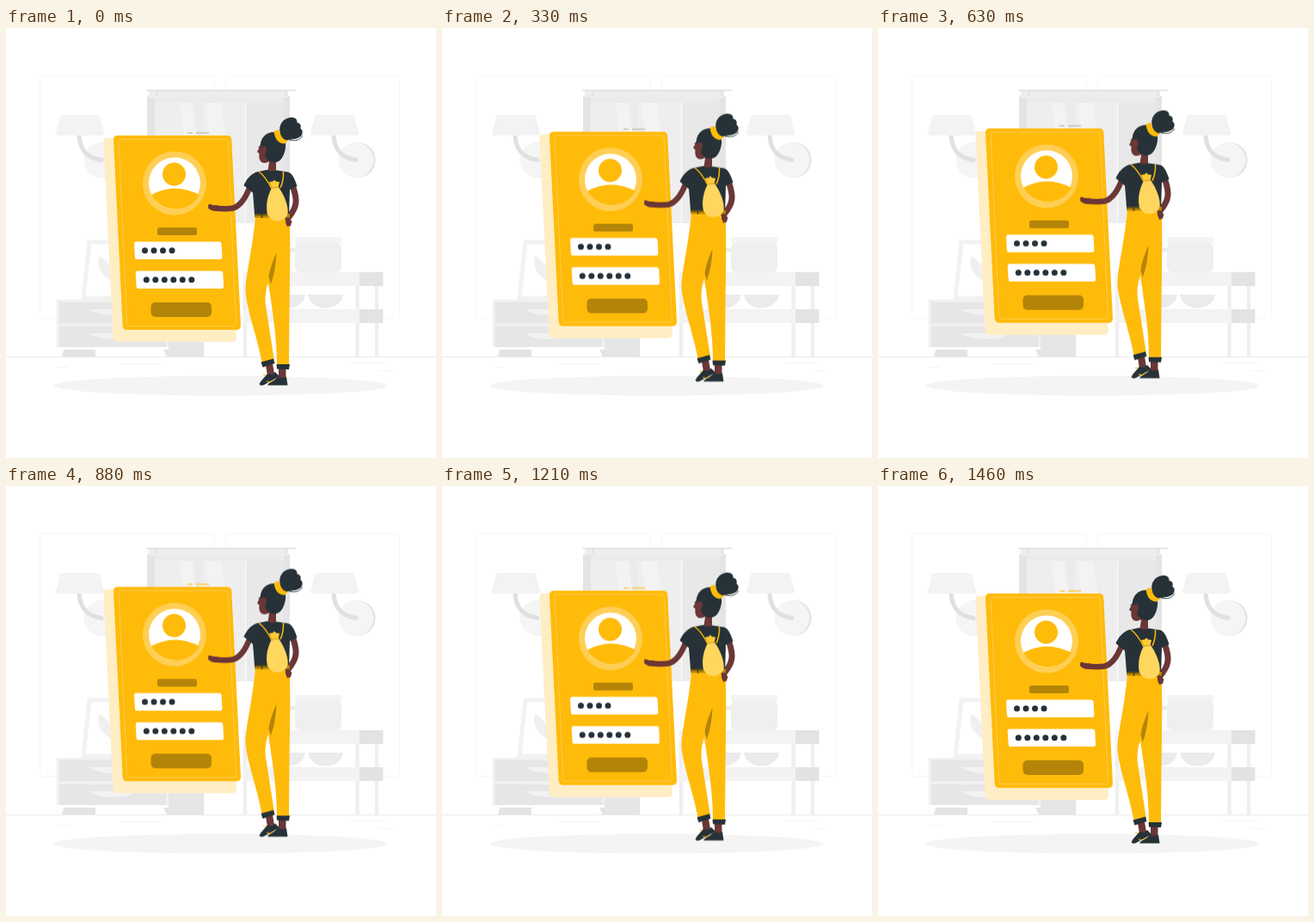
Recreate the animation shown at these times as an HTML page without scripts. Size 500 px wide and 500 px high, loop 1500 ms.

```html
<!DOCTYPE html>
<html lang="en">
<head>
<meta charset="utf-8">
<title>Login card</title>
<style>
  html, body { margin: 0; width: 100%; height: 100%; overflow: hidden; background: #fff; }
  svg { display: block; width: 100vw; height: 100vh; }
  .float { animation: float 750ms steps(18, jump-none) -4ms infinite alternate; }
  .dash { animation: tint 1500ms step-end infinite; }
  @keyframes float { to { transform: translateY(-9.4px); } }
  @keyframes tint { 0% { stroke: #c9c3b4; } 50% { stroke: #ffcb4a; } }
  .gold { fill: #ffbb0a; }
  .ochre { fill: #b38407; }
  .dark { fill: #263238; }
  .skin { fill: #6b3636; }
  .limb { fill: none; stroke: #6b3636; stroke-linecap: round; stroke-linejoin: round; }
  .strap { fill: none; stroke: #ffbb0a; stroke-width: 1.5; }
</style>
</head>
<body>
<svg viewBox="0 0 500 500">
  <defs>
    <g id="lamp">
      <circle cx="55" cy="53.500" r="20.500" fill="#e0e0e0"/>
      <circle cx="53" cy="53.500" r="20.500" fill="#f5f5f5"/>
      <path d="M27 25C28 43 37 51 53 53.500" fill="none" stroke="#e0e0e0" stroke-width="5" stroke-linecap="round"/>
      <path d="M8 1H48Q50 1 51 3L56 22Q56 25 53 25H2Q0 25 0 22L5 3Q6 1 8 1Z" fill="#f3f3f3"/>
    </g>
    <g id="drawer">
      <rect width="124" height="24" fill="#e6e6e6"/>
      <path d="M35 8H90C83 17 44 17 35 8Z" fill="#f2f2f2"/>
    </g>
    <g id="shelf">
      <rect x="276" width="135" height="16" fill="#f3f3f3"/>
      <rect x="411" width="27.500" height="16" fill="#e3e3e3"/>
    </g>
    <path id="bowl" d="M0 0H41C38 21 3 21 0 0Z" fill="#ebebeb"/>
    <circle id="dot" r="3.500" class="dark"/>
  </defs>

  <!-- Room -->
  <g fill="none" stroke="#f7f7f7">
    <rect x="39.500" y="55.500" width="203" height="282" rx="2"/>
    <rect x="255.500" y="55.500" width="202" height="282" rx="2"/>
  </g>

  <rect x="164" y="79" width="166" height="148" fill="#e4e4e4"/>
  <rect x="173" y="80" width="150" height="147" fill="#ebebeb"/>
  <path d="M173 87H219V187H173ZM228 87H277V227H228Z" fill="#eee"/>
  <path d="M201 87H216L222 125H207ZM231 87H250L256 130H237Z" fill="#f3f3f3"/>
  <path d="M278.500 87V227" stroke="#f7f7f7" stroke-width="2"/>
  <path d="M280 87H323V187H280Z" fill="#e8e8e8"/>
  <rect x="166" y="73" width="162" height="8" fill="#ededed"/>
  <path d="M163 72.500H337M175.500 73V79M325.500 73V79" stroke="#e0e0e0" stroke-width="1.500"/>

  <use href="#lamp" x="58" y="100"/>
  <use href="#lamp" x="354" y="100"/>

  <path d="M97 249H145L140 314H90Z" fill="#fff" stroke="#f2f2f2" stroke-width="5"/>
  <path d="M108 265C121 272 125 283 122 294C110 287 105 277 108 265Z" fill="#f0f0f0"/>
  <rect x="59" y="316" width="130" height="55" fill="#f0f0f0"/>
  <rect x="189" y="316" width="41" height="66" fill="#e6e6e6"/>
  <use href="#drawer" x="62" y="319"/>
  <use href="#drawer" x="62" y="347"/>
  <path d="M67 374H104V382H65ZM183 374H190V382H187Z" fill="#e3e3e3"/>

  <path d="M278 300V382M408.500 300V382M431 300V382" stroke="#efefef" stroke-width="4.500"/>
  <use href="#bowl" x="307" y="310"/>
  <use href="#bowl" x="351" y="310"/>
  <use href="#shelf" y="284"/>
  <use href="#shelf" y="327"/>
  <rect x="325" y="256" width="12" height="4" fill="#ebebeb"/>
  <rect x="336" y="243" width="54" height="8" rx="3" fill="#f3f3f3"/>
  <rect x="336" y="250" width="54" height="34" rx="6" fill="#efefef"/>

  <path d="M0 382.500H500" stroke="#ebebeb"/>
  <path d="M133 390.500H183M400 389.500H440M433 398.500H449M60 394.500H72" stroke="#f5f5f5"/>
  <ellipse cx="249.500" cy="416" rx="194" ry="11.500" fill="#f4f4f4"/>

  <g class="float">
    <!-- Card -->
    <path d="M118 128H250Q254 128 255 133L268 360Q268 365 263 365H130Q125 365 124.500 360L113.500 133Q113 128 118 128Z" fill="#ffedc4"/>
    <path class="gold" d="M130 125H257Q262 125 262.300 130L273 346Q273 351 268 351H141Q136 351 135.700 346L125 130Q125 125 130 125Z"/>
    <path d="M132 129.500H256Q258 129.500 258.200 132L267.500 344Q267.500 346.500 265 346.500H143Q141 346.500 140.800 344L131 132Q131 129.500 132 129.500Z" fill="none" stroke="#ffd166" stroke-width=".7"/>
    <path class="dash" d="M211 122H217M221 122H236" stroke-width="1.300"/>

    <circle cx="196" cy="180.500" r="37" fill="#ffce54"/>
    <circle cx="196" cy="180.500" r="30" fill="#fff"/>
    <circle class="gold" cx="195.500" cy="170" r="13.500"/>
    <path class="gold" d="M169 194Q196 179 225 194A32 32 0 0 1 169 194Z"/>

    <rect class="ochre" x="176" y="232" width="46" height="9" rx="2.500"/>
    <path id="field" d="M151 248.500H248Q250.500 248.500 250.600 251L251.400 266.500Q251.400 269 249 269H152Q150 269 149.900 266.500L149 251Q149 248.500 151 248.500Z" fill="#fff"/>
    <use href="#field" x="1.700" y="34"/>
    <use href="#dot" x="161.500" y="258.700"/>
    <use href="#dot" x="172" y="258.700"/>
    <use href="#dot" x="182.500" y="258.700"/>
    <use href="#dot" x="193" y="258.700"/>
    <use href="#dot" x="163.300" y="292.700"/>
    <use href="#dot" x="173.800" y="292.700"/>
    <use href="#dot" x="184.300" y="292.700"/>
    <use href="#dot" x="194.800" y="292.700"/>
    <use href="#dot" x="205.300" y="292.700"/>
    <use href="#dot" x="215.800" y="292.700"/>
    <rect class="ochre" x="168.500" y="319" width="70.500" height="17" rx="5"/>

    <!-- Legs -->
    <path class="skin" d="M302 392L310 390L312 402L304 404ZM317 394H325.500V408H317Z"/>
    <path class="dark" d="M294.500 414C297 409 301 406 304 402Q310 404 313 400L318 405C312 408 306 412 300 415Q296 417 294.500 414Z"/>
    <path class="dark" d="M304 415C307 411 313 410 316 405.500Q321 408 326 405.500L327.500 415.500H305Z"/>
    <path d="M299 403L302 404M303 411Q308 413 312 409" fill="none" stroke="#ffbb0a"/>
    <path class="gold" d="M290 219H329.500C331 245 330 300 329.500 330L329 393L315 392C315 360 310 330 305 296C301 306 301 318 302.500 326L312 387L298 391C292 358 279 325 278.500 305C278.500 288 287 255 290 219Z"/>
    <path class="ochre" d="M314.500 261Q306 281 305.500 290L308 298Q314 280 314.500 261Z"/>
    <path class="dark" d="M296.500 388.500L311 384.500L312.500 390L298.500 394.500ZM314.500 391H330L329 397L315 396.500Z"/>

    <!-- Arms and torso -->
    <path class="limb" d="M283 186C278 199 272 207 264 209.500Q255 211 243 209.500" stroke-width="6.500"/>
    <path class="skin" d="M247 206.500L241 206L236 204.500Q234.500 206 235.500 210L240 212.500L248 212.500Z"/>
    <path class="limb" d="M333.500 184C339 200 339 208 328 221" stroke-width="7"/>
    <path class="skin" d="M325 219L332.500 224.500L331 230L327 231L325 226Z"/>
    <path class="dark" d="M303 165L291 167.500C284 170 279 177 276.500 183L287 191.500Q288 202 289 217H329L330 188L338.500 184C336 176 333 169 328 167.500L315 165.500Z"/>
    <path class="ochre" d="M289 216H330V220.500H289Z"/>
    <path d="M289 217H305M297.500 216V221" stroke="#4d4214" stroke-width="1.500"/>
    <path class="strap" d="M294 167C301 172 305 179 309 187M322.500 167Q323 177 319 186"/>

    <!-- Bag -->
    <path d="M309 186C303 197 302 208 304 217Q308 224.500 316 224.500Q324 224 327.500 217C329 208 324 195 317 185Z" fill="#ffd75f"/>
    <path d="M306 179L310 178.500L312 176.500L314 178.500L318 179L316.500 186H309Z" fill="#ffca36"/>
    <path d="M308.500 186.500Q313 185 317.500 185.500" fill="none" stroke="#d59d13"/>

    <!-- Head -->
    <path class="skin" d="M305 150H314V165.500Q309 168 304.500 165.500L306 156Z"/>
    <path class="skin" d="M297 132L294.500 139L292 144L294.500 146Q293.500 154 298 156.500Q303 158 308 154L309 132Z"/>
    <path d="M293.500 138.500L297 137.500" stroke="#263238"/>
    <path class="dark" d="M296 139C295 128 302 121 312 121C322 121 329 133 323 147Q319 158 309 156Q303 154 301 148Q304 142 302 138Q299 136 296 139Z"/>
    <path class="gold" d="M311.500 120L317 118Q319 127 328.500 130L324 134.500Q313 134 311.500 120Z"/>
    <path class="dark" d="M319 123C316 113 322 105 331 104C337 103.500 339 107 338.500 110Q344 111 342.500 117Q346 119 344 124C341 130 332 129 326 130.500Q321 129 319 123Z"/>
    <path d="M329 130C336 132 343 130 344.500 125" fill="none" stroke="#263238" stroke-width=".9"/>
  </g>
</svg>
</body>
</html>
```
